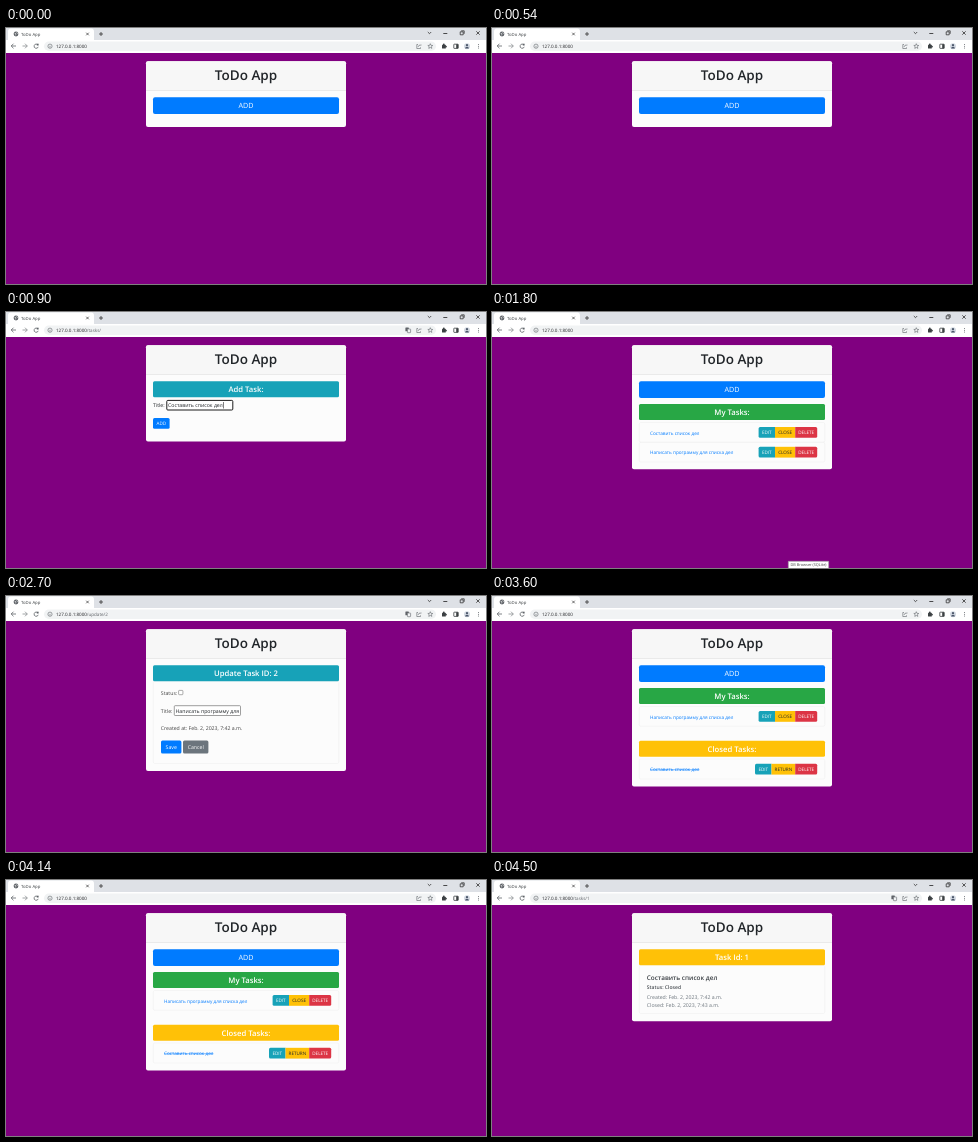
Recreate the animation shown at these times as an HTML page with a canvas. Size 480 by 256 pixels, loop 5400 ms.

```html
<!DOCTYPE html>
<html lang="en">
<head>
<meta charset="utf-8">
<title>ToDo App</title>
<style>
html, body { margin: 0; width: 100%; height: 100%; overflow: hidden; background: #800080; }
canvas { display: block; width: 480px; height: 256px; }
</style>
</head>
<body>
<canvas id="stage" width="480" height="256"></canvas>
<script>
const ctx = document.getElementById('stage').getContext('2d');
const FACE = '"Open Sans", "Noto Sans", sans-serif';
const BLUE = '#007bff', TEAL = '#17a2b8', GREEN = '#28a745', AMBER = '#ffc107',
      RED = '#dc3545', GRAY = '#6c757d', DARK = '#212529', ICON = '#5f6368';
const HOLD = 900;
const FIRST = 'Составить список дел';
const SECOND = 'Написать программу для списка дел';

function rect(x, y, w, h, color) {
  ctx.fillStyle = color;
  ctx.fillRect(x, y, w, h);
}

function box(x, y, w, h, radius, fill, stroke, width = 1) {
  ctx.beginPath();
  ctx.roundRect(x, y, w, h, radius);
  if (fill) { ctx.fillStyle = fill; ctx.fill(); }
  if (stroke) { ctx.strokeStyle = stroke; ctx.lineWidth = width; ctx.stroke(); }
}

function text(str, x, y, size, color = DARK, align = 'left', weight = 400) {
  ctx.font = `${weight} ${size}px ${FACE}`;
  ctx.textAlign = align;
  ctx.fillStyle = color;
  ctx.fillText(str, x, y);
  return ctx.measureText(str).width;
}

function line(color, width, ...points) {
  ctx.beginPath();
  points.forEach(([x, y], i) => i ? ctx.lineTo(x, y) : ctx.moveTo(x, y));
  ctx.strokeStyle = color;
  ctx.lineWidth = width;
  ctx.stroke();
}

function arc(x, y, r, color, width = 0, from = 0, to = Math.PI * 2) {
  ctx.beginPath();
  ctx.arc(x, y, r, from, to);
  if (width) {
    ctx.strokeStyle = color;
    ctx.lineWidth = width;
    ctx.stroke();
  } else {
    ctx.fillStyle = color;
    ctx.fill();
  }
}

function cross(x, y, r, width) {
  line('#333', width, [x - r, y - r], [x + r, y + r]);
  line('#333', width, [x + r, y - r], [x - r, y + r]);
}

function titleBar() {
  rect(0, 0, 480, 12, '#dee1e6');
  box(2, 0.5, 86, 13, [3, 3, 0, 0], '#fff');
  arc(10, 6, 2.4, ICON);
  line('#fff', 0.6, [8.4, 5], [10, 5.7], [9.6, 7.4]);
  line('#fff', 0.6, [10.6, 4.2], [11.8, 5.8]);
  text('ToDo App', 15, 7.6, 4.25, '#3c4043');
  cross(81.5, 6, 1.3, 0.7);
  line('#333', 0.8, [93, 6], [97, 6]);
  line('#333', 0.8, [95, 4], [95, 8]);
  line('#333', 0.8, [421.8, 4], [423.5, 5.7], [425.2, 4]);
  line('#222', 0.8, [437.3, 5.5], [441.3, 5.5]);
  box(454.2, 3.8, 3, 3, 0, null, '#222', 0.7);
  line('#222', 0.7, [455.2, 2.8], [458.2, 2.8], [458.2, 5.8]);
  cross(472, 5, 1.7, 0.8);
}

function star(x, y, r) {
  const points = [];
  for (let i = 0; i <= 10; i++) {
    const a = -Math.PI / 2 + i * Math.PI / 5, d = i % 2 ? r * 0.45 : r;
    points.push([x + d * Math.cos(a), y + d * Math.sin(a)]);
  }
  line(ICON, 0.6, ...points);
}

function toolbar(path) {
  rect(0, 12, 480, 13, '#fff');
  line(ICON, 0.8, [10, 18], [5.2, 18]);
  line(ICON, 0.8, [7.5, 15.7], [5.2, 18], [7.5, 20.3]);
  line('#8a8d91', 0.8, [16.5, 18], [21.3, 18]);
  line('#8a8d91', 0.8, [19, 15.7], [21.3, 18], [19, 20.3]);
  arc(30.2, 18.2, 2.1, ICON, 0.8, 0.3, 5.4);
  rect(30.8, 15.7, 1.8, 1.8, ICON);

  box(38, 13.5, 392, 9.5, 4.75, '#f1f3f4');
  arc(44, 18.2, 2.1, ICON, 0.6);
  rect(43.7, 17.8, 0.6, 1.7, ICON);
  const hostWidth = text('127.0.0.1:8000', 50, 20, 4.55, '#202124');
  text(path, 50 + hostWidth, 20, 4.55, ICON);

  if (path) {
    box(399.4, 15.4, 3.4, 3.8, 0.5, ICON);
    box(401.4, 17, 3.2, 3.7, 0.5, '#f1f3f4', ICON, 0.6);
  }
  line(ICON, 0.6, [412, 16.5], [410.8, 16.5], [410.8, 20.5], [414.5, 20.5], [414.5, 19.3]);
  line(ICON, 0.6, [412, 19], [413, 17.3], [415.5, 17]);
  star(424.3, 18.3, 2.6);

  box(436, 16.8, 3.8, 3.7, 0.5, '#3c4043');
  arc(437.8, 16.5, 0.9, '#3c4043');
  arc(440, 18.6, 0.9, '#3c4043');
  box(447.8, 16.2, 4.4, 4.2, 0.4, null, '#3c4043', 0.8);
  rect(450.2, 16.2, 2, 4.2, '#3c4043');
  arc(461, 18.2, 3, '#d3d9e2');
  arc(461, 17.2, 1.1, '#4a5568');
  arc(461, 20.6, 1.9, '#4a5568', 0, Math.PI, Math.PI * 2);
  for (const y of [16.4, 18.2, 20]) arc(472.5, y, 0.5, ICON);
}

function card(bottom) {
  box(140, 33.3, 200, bottom - 33.3, 2, '#fcfcfc');
  box(140, 33.3, 200, 29, [2, 2, 0, 0], '#f7f7f7');
  rect(140, 62, 200, 0.6, '#dfdfdf');
  text('ToDo App', 240, 52, 13.5, DARK, 'center', 600);
}

function banner(label, y, color) {
  box(147, y, 186, 16, 1.5, color);
  text(label, 240, y + 10.9, 7.7, '#fff', 'center', 600);
}

function button(label, x, y, w, h, color, size = 4.6, radius = 1.5) {
  box(x, y, w, h, radius, color);
  text(label, x + w / 2, y + h / 2 + size * 0.36, size,
       color === AMBER ? DARK : '#fff', 'center');
}

function addButton() {
  button('ADD', 147, 69.2, 186, 16.8, BLUE, 7.2, 2);
}

function panel(top, bottom) {
  box(147.25, top, 185.5, bottom - top, 1.5, null, '#ececec', 0.5);
}

function taskRow(title, y, closed) {
  const width = text(title, 158, y + 2.2, 4.7, BLUE);
  if (closed) rect(158, y + 0.4, width, 0.5, BLUE);
  const left = closed ? 263 : 266.6, middle = closed ? 279.5 : 283;
  const top = y - 5.4;
  button('EDIT', left, top, middle - left, 10.8, TEAL, 4.6, [1.5, 0, 0, 1.5]);
  button(closed ? 'RETURN' : 'CLOSE', middle, top, 303.2 - middle, 10.8, AMBER, 4.6, 0);
  button('DELETE', 303.2, top, 22, 10.8, RED, 4.6, [0, 1.5, 1.5, 0]);
}

function homePage() {
  card(99);
  addButton();
}

function addPage() {
  card(129.6);
  banner('Add Task:', 69.2, TEAL);
  text('Title:', 147, 95.1, 5.2);
  box(160.8, 88.4, 66, 9.6, 1, '#fff', '#1c1c1c', 1);
  const width = text(FIRST, 162, 95.1, 5.2);
  rect(162.3 + width, 90, 0.5, 6.5, '#000');
  button('ADD', 147, 106, 16.6, 10.8, BLUE);
}

function tasksPage() {
  card(157.2);
  addButton();
  banner('My Tasks:', 92, GREEN);
  panel(110.5, 130.3);
  panel(130.3, 150);
  taskRow(FIRST, 120.4);
  taskRow(SECOND, 140.2);
  box(296.3, 249.3, 40.4, 8, 0, '#fff', '#999', 0.6);
  text('DB Browser (SQLite)', 316.5, 254.2, 3.85, '#444', 'center');
}

function updatePage() {
  card(175);
  panel(85, 167.5);
  banner('Update Task ID: 2', 69.2, TEAL);
  text('Status:', 154.8, 98.8, 5.2, '#444');
  box(172.6, 94.4, 4.3, 4.3, 0.7, '#fff', '#767676', 0.6);
  text('Title:', 154.8, 116.7, 5.2, '#444');
  box(168.3, 109.7, 66.2, 9.8, 0.8, '#fff', '#767676', 0.7);
  ctx.save();
  ctx.beginPath();
  ctx.rect(169, 110, 64.5, 9);
  ctx.clip();
  text(SECOND, 169.5, 116.7, 5.2);
  ctx.restore();
  text('Created at: Feb. 2, 2023, 7:42 a.m.', 154.8, 133.6, 5.2, '#444');
  button('Save', 155, 144.4, 20.4, 13, BLUE, 5.2);
  button('Cancel', 177, 144.4, 25.4, 13, GRAY, 5.2);
}

function closedPage() {
  card(190.5);
  addButton();
  banner('My Tasks:', 92, GREEN);
  panel(110.5, 130.3);
  taskRow(SECOND, 120.4);
  banner('Closed Tasks:', 144.7, AMBER);
  panel(163, 183);
  taskRow(FIRST, 173.2, true);
}

function detailPage() {
  card(141.2);
  panel(85, 133.5);
  banner('Task Id: 1', 69.2, AMBER);
  text(FIRST, 154.8, 99.7, 6.4, '#3a3f44', 'left', 600);
  text('Status: Closed', 154.8, 108.7, 5.05, '#4a4f54', 'left', 600);
  text('Created: Feb. 2, 2023, 7:42 a.m.', 154.8, 118.9, 5.2, GRAY);
  text('Closed: Feb. 2, 2023, 7:43 a.m.', 154.8, 127.2, 5.2, GRAY);
}

const scenes = [
  { path: '', draw: homePage },
  { path: '/tasks/', draw: addPage },
  { path: '', draw: tasksPage },
  { path: '/update/2', draw: updatePage },
  { path: '', draw: closedPage },
  { path: '/tasks/1', draw: detailPage },
];

const start = performance.now();

function render() {
  const elapsed = Math.max(0, performance.now() - start);
  const scene = scenes[Math.floor(elapsed / HOLD) % scenes.length];
  ctx.textRendering = 'geometricPrecision';
  rect(0, 0, 480, 256, '#800080');
  titleBar();
  toolbar(scene.path);
  scene.draw();
  requestAnimationFrame(render);
}
render();
</script>
</body>
</html>
```
